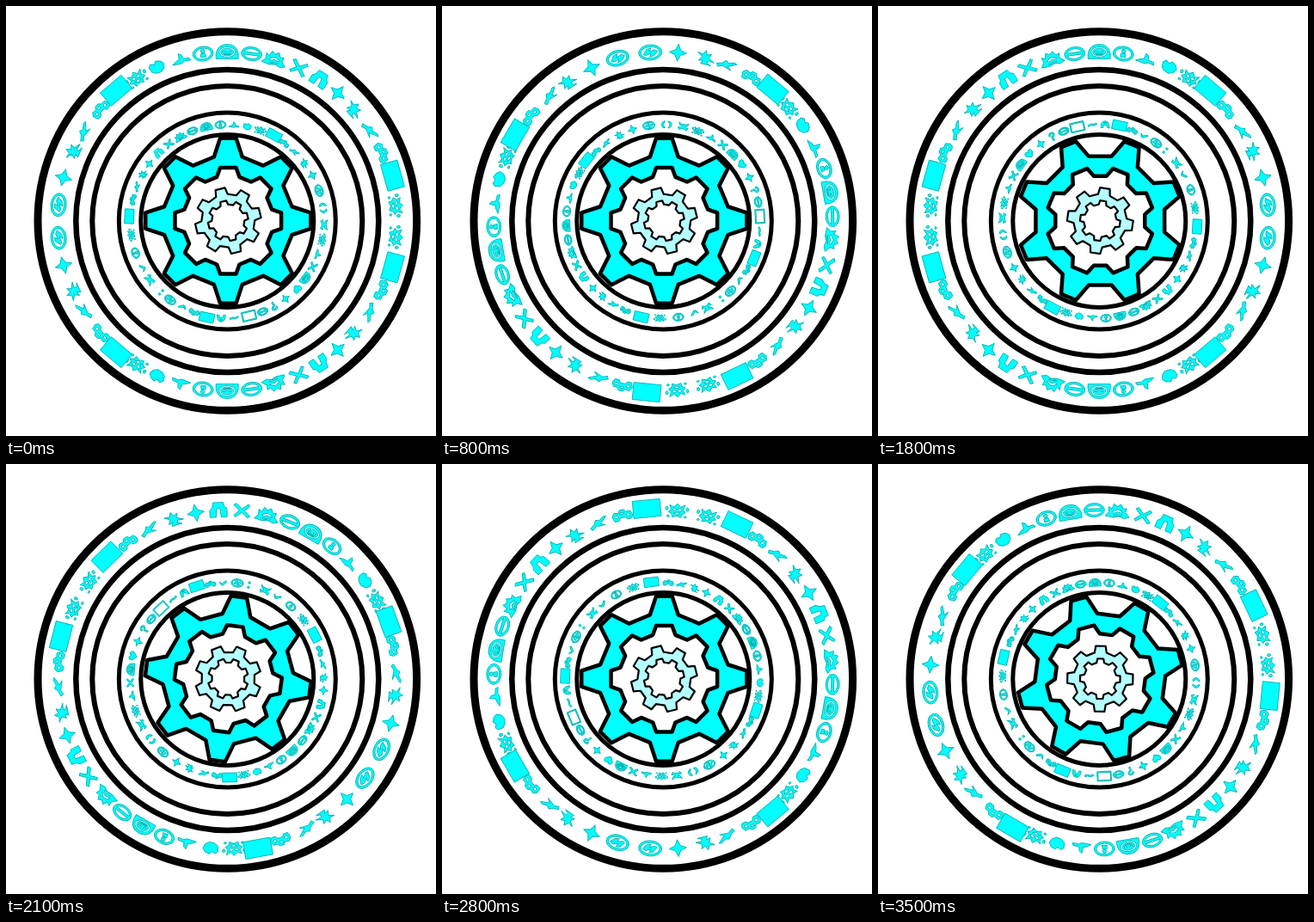
Write an HTML page that moves like this. It is 500 px wide and 500 px high and loops after 3.6 s.

```html
<!DOCTYPE html>
<html>
<head>
<meta charset="utf-8">
<style>
html, body { margin: 0; width: 100%; height: 100%; overflow: hidden; background: #fff; }
svg { display: block; width: 100vw; height: 100vh; }
</style>
</head>
<body>
<svg id="stage" viewBox="0 0 500 500"></svg>
<script>
const svg = document.getElementById('stage');
const STEP_MS = 100, STEPS = 36;

function add(parent, tag, attrs) {
  const el = document.createElementNS('http://www.w3.org/2000/svg', tag);
  for (const key in attrs) el.setAttribute(key, attrs[key]);
  parent.appendChild(el);
  return el;
}

const oval = (rx, ry, x = 0, y = 0) =>
  `M${x - rx} ${y}a${rx} ${ry} 0 1 0 ${2 * rx} 0a${rx} ${ry} 0 1 0 ${-2 * rx} 0Z`;
const box = (w, h, x = 0, y = 0) => `M${x - w / 2} ${y - h / 2}h${w}v${h}h${-w}Z`;

// Upright glyphs, drawn with the even-odd rule; "up" points away from the hub.
const glyphs = {
  mask: 'M-13 8L-13 2Q-11 -9 0 -9Q11 -9 13 2L13 8Z' + oval(9.5, 6, 0, 0) + oval(7.5, 4.3, 0, 0)
    + 'M-5 -1h3v1.5h-3ZM2 -1h3v1.5h-3ZM-4 2h8v1h-8Z',
  info: oval(12, 8.5) + oval(9.5, 6.3) + oval(2.4, 2, 0, -3) + 'M-3 0L2 -.5L3 4L-3 4Z',
  bar: oval(12, 8) + 'M-9 -1.5Q-7 -5.5 0 -5.8Q7 -5.5 9 -1.5ZM-9 1.5Q-7 5.5 0 5.8Q7 5.5 9 1.5Z',
  hat: 'M-14 7L-10 2L-11 -4L-7 -2L-5 -8L-1 -5L3 -8L6 -3L10 -4L9 1L14 6L8 8L2 6L-4 8Z'
    + 'M-6 1L0 -2L6 1L4 2L0 1L-4 3ZM-5 5L5 4L4 5.5L-4 6Z',
  cross: 'M-10 -6L-7 -8L0 -2L7 -8L9 -6L3 0L10 6L7 8L0 2L-7 8L-9 6L-3 0Z',
  pants: 'M-6 -9L6 -9L7 -4L10 -2L10 8L3 8L2 -2L-2 -2L-3 8L-10 8L-10 0L-7 -3Z',
  star: 'M0 -10L3 -3L10 0L3 3L0 10L-3 3L-10 0L-3 -3Z',
  bird: 'M-10 -4L-4 -3L-1 -8L1 -3L6 -5L4 0L11 4L4 3L3 6L8 8L-4 8L-2 4L-7 5L-4 0Z',
  runner: 'M-11 3L-5 0L-2 -4L2 -2L8 -5L11 -4L5 0L2 2L7 5L1 4L-4 3L-9 6Z',
  car: 'M-12 0L-9 -4L-4 -3L-2 -6L3 -6L5 -3L10 -3L12 2L10 6L5 6L3 3L-3 3L-5 6L-10 6Z'
    + oval(2, 1.6, -7, 1) + oval(2, 1.6, 7, 1) + 'M-2 -3h4v2h-4Z',
  block: box(32, 20, 0, -2.5),
  face: 'M-9 -6L-4 -4L0 -8L4 -4L9 -7L7 -1L10 2L6 4L5 8L0 6L-5 8L-6 4L-10 2L-7 -1Z'
    + oval(2.2, 1.6, -3, -1) + oval(2.2, 1.6, 3, -1) + 'M-4 3L0 2L4 3L0 5Z'
    + oval(1.5, 2, -12, -2) + oval(1.5, 2, 12, -2) + oval(1.5, 1, -10, 7) + oval(1.5, 1, 10, 7),
  swirl: oval(13.5, 9) + oval(11, 6.7) + 'M-8 2L-4 -4L1 -5L-1 -1L5 -3L9 -1L4 4L-1 5L1 1L-5 3Z',
  apple: 'M-9 -3L-6 -6L-2 -4L1 -7L6 -5L9 -1L7 4L2 7L-4 6L-8 3Z',
  boat: 'M-11 5L-6 2L-2 1L-1 -6L2 -4L3 1L10 2L11 5L4 4L0 6Z',
  wave: 'M-10 1L-3 -2L3 -1L9 -3L10 0L3 2L-3 1L-9 4Z',
  frame: box(31, 21) + box(27, 17),
  query: 'M-6 -4Q-4 -9 1 -9Q8 -8 7 -3Q6 0 1 2L1 4L-2 4L-2 0Q4 -2 4 -4Q3 -7 0 -6L-4 -2Z' + oval(2, 1.8, 0, 7.5),
  heart: 'M0 8L-9 0Q-11 -7 -5 -8Q-1 -8 0 -4Q1 -8 5 -8Q11 -7 9 0Z',
  tick: 'M-8 -2L-2 2L7 -4L9 -2L0 6L-4 5Z',
  dots: oval(2.5, 2.5, 0, -5) + oval(2.5, 2.5, 0, 5),
  loop: 'M-4 -8Q-12 -5 -11 2L-8 7L-3 7L-7 1Q-7 -4 -4 -5ZM4 8Q12 5 11 -2L8 -7L3 -7L7 -1Q7 4 4 5Z',
  imp: 'M-11 -8L-5 -5L5 -5L11 -8L8 -2L3 -1L7 3L11 2L8 8L3 5L-3 5L-8 8L-11 2L-6 3L-3 -1L-8 -2Z',
  cap: 'M-9 7L-8 -3Q-5 -8 0 -8Q6 -8 8 -2L10 7L5 6L3 1L-3 1L-4 7Z' + box(6, 2, 0, -4)
};

function ring(radius, scale, marks) {
  const g = add(svg, 'g', { fill: '#0ff', 'fill-rule': 'evenodd', stroke: '#00b4b4', 'stroke-width': 0.9 / scale });
  for (const [name, angle] of marks) {
    add(g, 'path', { d: glyphs[name], transform: `rotate(${angle}) translate(0 ${-radius}) scale(${scale})` });
  }
  return g;
}

function gearPath(tip, tipHalf, base, baseHalf) {
  const points = [];
  for (let tooth = 0; tooth < 360; tooth += 45) {
    for (const [r, a] of [[base, -baseHalf], [tip, -tipHalf], [tip, tipHalf], [base, baseHalf]]) {
      const rad = (tooth + a) * Math.PI / 180;
      points.push(`${(r * Math.sin(rad)).toFixed(2)} ${(-r * Math.cos(rad)).toFixed(2)}`);
    }
  }
  return `M${points.join('L')}Z`;
}

// A toothed ring: outer outline plus a white toothed hole, turning as one piece.
function gear(fill, width, outer, hole) {
  const g = add(svg, 'g', { stroke: '#000', 'stroke-width': width, 'stroke-linejoin': 'round' });
  add(g, 'path', { d: gearPath(...outer), fill });
  add(g, 'path', { d: gearPath(...hole), fill: '#fff' });
  return g;
}

// The outer band mirrors top to bottom.
const right = [['bar', 8.3], ['hat', 16.3], ['cross', 25], ['pants', 33], ['star', 40.7], ['bird', 48.5],
  ['runner', 57.5], ['car', 66], ['block', 74.5], ['face', 84.7]];
const left = [['info', -8.2], ['boat', -16], ['apple', -24.4], ['face', -32.3], ['block', -40.3], ['car', -48.5],
  ['runner', -58], ['bird', -65.5], ['star', -75], ['swirl', -84.4]];
const half = [['mask', 0], ...right, ...left];
const outerMarks = [...half, ...half.map(([name, a]) => [name, 180 - a])];

const innerMarks = [['boat', 4], ['apple', 12], ['face', 20], ['block', 28.5], ['car', 36], ['runner', 44],
  ['bird', 53], ['star', 61.5], ['swirl', 71.5], ['loop', 82], ['imp', 92], ['face', 101], ['boat', 110],
  ['cross', 118], ['mask', 126], ['heart', 134], ['star', 143], ['query', 151], ['bar', 158.5], ['frame', 167],
  ['wave', 176], ['cap', 183.5], ['block', 192], ['car', 200], ['tick', 207.5], ['swirl', 216], ['dots', 223],
  ['imp', 233], ['tick', 241], ['info', 251], ['face', 262], ['block', 273], ['car', 283], ['runner', 291],
  ['bird', 299], ['star', 306.5], ['pants', 315], ['cross', 323], ['hat', 331], ['bar', 339], ['mask', 347.5],
  ['info', 356]];

for (const [r, width] of [[220.3, 9], [176, 6.5], [157, 6], [126, 5], [100.5, 5]]) {
  add(svg, 'circle', { cx: 257.3, cy: 250, r, fill: '#fff', stroke: '#000', 'stroke-width': width });
}

const HUB = [258.3, 249.7], BAND = [257.2, 250.5];
const perStep = step => step;
// Gears pass three notches every two steps, landing on whole notches only.
const perNotch = step => Math.floor(step * 1.5);

const parts = [
  { el: ring(197, 1, outerMarks), at: BAND, count: perStep, turn: 10, start: 0 },
  { el: ring(112.7, 0.53, innerMarks), at: BAND, count: perStep, turn: -10, start: 0 },
  { el: gear('#0ff', 4.5, [96.5, 5.5, 76, 12.5], [62.5, 8.5, 52.5, 14.5]), at: HUB, count: perNotch, turn: 7.5, start: 0 },
  { el: gear('#b4ffff', 2.2, [38.5, 8.5, 31, 13], [23.5, 8.5, 19, 13.5]), at: HUB, count: perNotch, turn: -7.5, start: 31 }
];

function draw(ms) {
  const step = Math.floor(ms / STEP_MS) % STEPS;
  for (const { el, at, count, turn, start } of parts) {
    el.setAttribute('transform', `translate(${at}) rotate(${start + turn * count(step)})`);
  }
}

let begin = null;
function tick(now) {
  if (begin === null) begin = now;
  draw(now - begin);
  requestAnimationFrame(tick);
}
draw(0);
requestAnimationFrame(tick);
</script>
</body>
</html>
```
